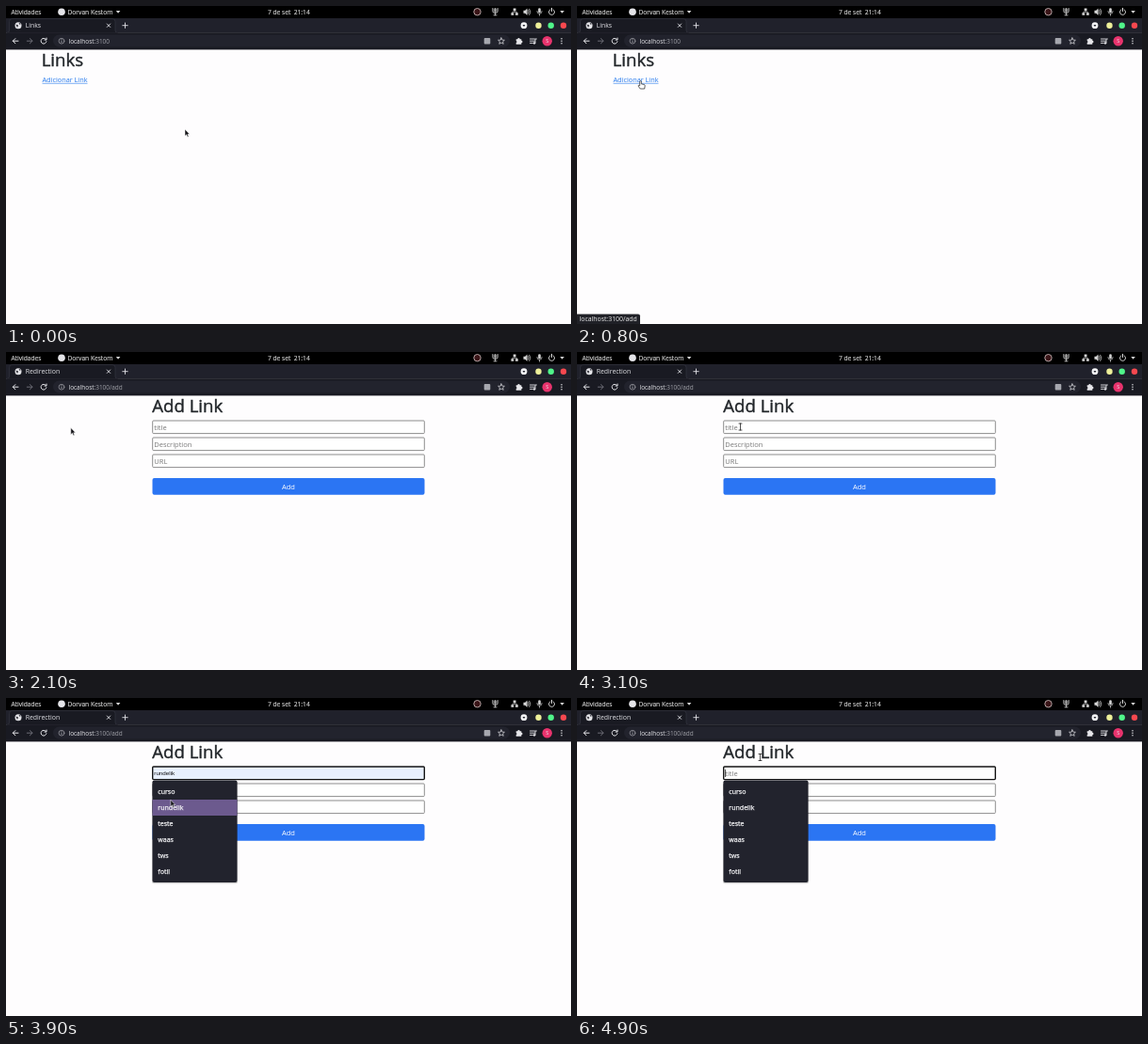
An HTML page for the animation above (5000 ms loop, 600 by 338 pixels).

```html
<!DOCTYPE html>
<html lang="pt">
<head>
<meta charset="utf-8">
<title>Links</title>
<style>
html, body { margin: 0; height: 100%; overflow: hidden; background: #fefdfe; }
svg { display: block; width: 100vw; height: 100vh; }
text { font: 7.5px "Open Sans", "Noto Sans", sans-serif; fill: currentColor; }
.bar text { font-size: 6.65px; stroke: currentColor; stroke-width: .15; }
.tab text, .status text { font-size: 6.9px; }
.url text { font-size: 6.45px; }
.head { font-size: 18.6px; color: #212529; stroke: currentColor; stroke-width: .4; }
.hint { color: #777; }
.typed { font: 6.25px "Liberation Sans", Arial, sans-serif; color: #111; }
.menu text { font-size: 7.05px; color: #f4f4f6; stroke: currentColor; stroke-width: .25; }
.line { fill: none; stroke: currentColor; stroke-linecap: round; stroke-linejoin: round; }
.field { fill: #fff; stroke: #808080; stroke-width: .9; }
</style>
</head>
<body>
<svg viewBox="0 0 600 338" preserveAspectRatio="none">
  <rect width="600" height="338" fill="#fefdfe"/>

  <!-- desktop bar -->
  <rect width="600" height="13" fill="#000"/>
  <g class="bar" color="#d6d6d6">
    <text x="5.5" y="8.6">Atividades</text>
    <circle cx="59" cy="6.3" r="3.8" fill="#e4e4e8"/>
    <text x="65.5" y="8.6">Dorvan Kestom</text>
    <path d="M116.8 5h4.6l-2.3 2.8z" fill="currentColor"/>
    <text x="278" y="8.6">7 de set&nbsp; 21:14</text>
    <circle cx="500.5" cy="6.2" r="3.7" fill="#3a1518" stroke="#d8c8c8" stroke-width=".8"/>
    <path class="line" d="M516.8 2.5v3q0 2 2.7 2t2.7-2v-3M519.5 2.5v7.2M518 9.8h3M518.2 3v3M520.8 3v3" stroke-width=".8"/>
    <path d="M538.7 2.4h2.8v2.6h-2.8zM536.4 7.2h2.8v2.6h-2.8zM541 7.2h2.8v2.6h-2.8z" fill="currentColor"/>
    <path class="line" d="M540.1 5v1.2M537.8 7.2v-1h4.6v1" stroke-width=".7"/>
    <path d="M549.5 4.8h1.8l2.2-2.2v7.4l-2.2-2.2h-1.8z" fill="currentColor"/>
    <path class="line" d="M554.5 4.6q1.2 1.7 0 3.4M555.8 3.2q2.2 3.1 0 6.2" stroke-width=".8"/>
    <rect x="565.2" y="2.2" width="2.6" height="5" rx="1.3" fill="currentColor"/>
    <path class="line" d="M563.9 5.5q0 2.8 2.6 2.8t2.6-2.8M566.5 8.3v1.9" stroke-width=".7"/>
    <path class="line" d="M577.9 3.8a3 3 0 1 0 3.2 0M579.5 2.3v3.2" stroke-width="1"/>
    <path d="M588.3 5h4.6l-2.3 2.8z" fill="currentColor"/>
  </g>

  <!-- tab strip -->
  <rect y="13" width="600" height="15.5" fill="#20212b"/>
  <path d="M1 28.5q2.5 0 2.5-2.5V16.500q0-3 3-3H113q3 0 3 3V26q0 2.500 2.500 2.500z" fill="#191a22" stroke="#383944" stroke-width=".6"/>
  <rect y="28.2" width="600" height="18.2" fill="#191a22"/>
  <g class="tab" color="#e4e4e8">
    <circle cx="13" cy="20.700" r="3.500" fill="currentColor"/>
    <path d="M10.500 19.500l2.500 1-1 2.600zM13.500 18l2 .4-.5 1.800z" fill="#191a22"/>
    <text id="tab" x="20.700" y="23.200"></text>
    <path class="line" d="M107.300 19l3.400 3.400m0-3.400l-3.400 3.400M126.500 18v5.400M123.800 20.700h5.400" stroke-width=".9"/>
  </g>
  <circle cx="550" cy="20.700" r="3.400" fill="#f2f2f4"/>
  <path d="M548.500 20h3l-1.500 1.900z" fill="#20212b"/>
  <circle cx="565.500" cy="20.700" r="3.200" fill="#eef09a"/>
  <circle cx="578.700" cy="20.700" r="3.200" fill="#50f58a"/>
  <circle cx="592" cy="20.700" r="3.200" fill="#f8484f"/>

  <!-- address bar -->
  <rect x="50" y="30.500" width="485" height="13" rx="6.500" fill="#22232d"/>
  <g color="#e6e6ea">
    <path class="line" d="M13 37.200H7.300m2.600-2.600l-2.600 2.600 2.600 2.600M42.400 35.500a2.900 2.900 0 1 0 .5 2.300M43 34v2h-2" stroke-width="1"/>
    <path class="line" d="M22.300 37.200H28m-2.600-2.600l2.600 2.600-2.600 2.600" color="#6a6b74" stroke-width="1"/>
    <g color="#a6a7ae">
      <circle class="line" cx="59" cy="37.200" r="2.900" stroke-width=".7"/>
      <path class="line" d="M59 37v1.600M59 35.600v.1" stroke-width=".8"/>
      <rect x="507.700" y="33.900" width="6.600" height="6.600" rx="1" fill="currentColor"/>
    </g>
    <g class="url"><text x="66.500" y="39.500">localhost<tspan id="path" fill="#a2a3aa"></tspan></text></g>
    <path class="line" d="M526 33.900l1 2.200 2.400.2-1.800 1.600.6 2.400-2.200-1.300-2.200 1.300.6-2.400-1.800-1.600 2.400-.2z" stroke-width=".7"/>
    <path d="M541.700 35.300h1.600a1.200 1.200 0 0 1 2.400 0h1.600v1.500a1.200 1.200 0 0 1 0 2.400v1.600h-5.600v-1.800a1.100 1.100 0 0 0 0-2.100z" fill="currentColor"/>
    <path class="line" d="M556.500 35h5M556.500 37.200h5M556.500 39.400h2.800M562 39.300v-4.300h1.400" stroke-width=".9"/>
    <circle cx="561" cy="39.400" r="1.200" fill="currentColor"/>
    <circle cx="574.700" cy="37.200" r="5.200" fill="#e8336d"/>
    <text x="574.700" y="39.300" text-anchor="middle" style="font-size:5.500px">S</text>
    <path class="line" d="M590 34.700v.01M590 37.200v.01M590 39.700v.01" stroke-width="1.500"/>
  </g>

  <g id="home">
    <text class="head" x="37.700" y="64.300">Links</text>
    <text x="38.500" y="81" style="font-size:7.300px" color="#2479ec">Adicionar Link</text>
    <path d="M38.500 82.300H86.500" stroke="#2479ec" stroke-width=".6"/>
  </g>

  <g id="form">
    <text class="head" x="155.300" y="64.300">Add Link</text>
    <rect id="title" class="field" x="155.700" y="73" width="288.600" height="13.600" rx="1"/>
    <rect class="field" x="155.700" y="91" width="288.600" height="13.600" rx="1"/>
    <rect class="field" x="155.700" y="109" width="288.600" height="13.600" rx="1"/>
    <text id="hint" class="hint" x="157.300" y="82.600">title</text>
    <text class="hint" x="157.300" y="100.600">Description</text>
    <text class="hint" x="157.300" y="118.600">URL</text>
    <text id="typed" class="typed" x="157.300" y="82.200"></text>
    <path id="caret" d="M157.500 76v8" stroke="#111" stroke-width=".7"/>
    <rect x="155.500" y="134" width="289" height="17.800" rx="2" fill="#2b75f3"/>
    <text x="300" y="145.600" text-anchor="middle" color="#fff">Add</text>
  </g>

  <g id="menu" class="menu">
    <rect x="155" y="88" width="91" height="109.300" rx="2" fill="#000" opacity=".2"/>
    <rect x="155.500" y="87.500" width="90" height="108.500" rx="2" fill="#22232d"/>
    <rect id="hover" x="155.500" width="90" height="17" fill="#6c5a8e"/>
  </g>

  <g id="status" class="status" color="#eee">
    <path d="M0 338V327.500H65q2 0 2 2V338z" fill="#202127"/>
    <text x="2.500" y="335.200">localhost:3100/add</text>
  </g>

  <g id="pointer">
    <path id="arrow" d="M0 0V7.200L1.700 5.700 2.800 8.200 4 7.700 2.900 5.300H5z" fill="#16161a" stroke="#fff" stroke-width=".5"/>
    <path id="hand" d="M-.8 .6q.8-1.200 1.600 0V3.300l3 .7q1 .3.900 1.300L4.200 8.500H-.3L-2.500 5.500q-.2-1.200 1.700-.4z" fill="#fff" stroke="#222" stroke-width=".7"/>
    <path id="beam" class="line" d="M-1.500-3.500H1.500M0-3.500V3.500M-1.500 3.500H1.500" color="#222" stroke-width=".8"/>
  </g>
</svg>
<script>
const $ = id => document.getElementById(id);
const show = (id, on) => $(id).style.display = on ? "" : "none";
const items = ["curso", "rundelik", "teste", "waas", "tws", "fotil"];
const rowTop = i => 91 + 17 * i;

items.forEach((word, i) => {
  const label = document.createElementNS("http://www.w3.org/2000/svg", "text");
  label.setAttribute("x", 161.3);
  label.setAttribute("y", rowTop(i) + 11.2);
  label.textContent = word;
  $("menu").append(label);
});

// pointer stops: time, x, y
const stops = [
  [0, 190, 131], [600, 67.5, 79.5], [1900, 67.5, 79.5], [2100, 68.8, 80.5],
  [2500, 91, 84], [3100, 173.5, 79.5], [3600, 173.5, 79.5],
  [3900, 174.8, 108.2], [4200, 177, 113], [4800, 194.5, 63], [5000, 194.5, 63]
];

function pointerAt(t) {
  const i = stops.findIndex(s => s[0] > t);
  const [t0, x0, y0] = stops[i - 1], [t1, x1, y1] = stops[i];
  const u = (t - t0) / (t1 - t0), k = u * u * (3 - 2 * u);
  return [x0 + (x1 - x0) * k, y0 + (y1 - y0) * k];
}

function draw(now) {
  const t = Math.floor(now % 5000 / 100) * 100;
  const [x, y] = pointerAt(t);
  const adding = t >= 1100, open = t >= 3300;
  const row = open && y >= rowTop(0) ? Math.floor((y - rowTop(0)) / 17) : -1;
  const picked = row >= 0;

  show("home", !adding);
  show("form", adding);
  show("menu", open);
  show("status", t >= 500 && t < 1600);
  $("tab").textContent = adding ? "Redirection" : "Links";
  $("path").textContent = adding ? ":3100/add" : ":3100";

  $("title").style.cssText = open
    ? `stroke:#151515;stroke-width:1.4;fill:${picked ? "#e8f0fe" : "#fff"}` : "";
  show("hint", !picked);
  show("caret", open && !picked);
  show("hover", picked);
  $("hover").setAttribute("y", rowTop(Math.max(row, 0)));
  $("typed").textContent = picked ? items[row] : "";

  const hand = t >= 500 && t < 1700;
  const beam = adding && x > 155 && y < 87;
  show("hand", hand);
  show("beam", beam);
  show("arrow", !hand && !beam);
  $("pointer").setAttribute("transform", `translate(${x} ${y})`);
}

const start = performance.now();
(function loop() {
  draw(performance.now() - start);
  requestAnimationFrame(loop);
})();
</script>
</body>
</html>
```
